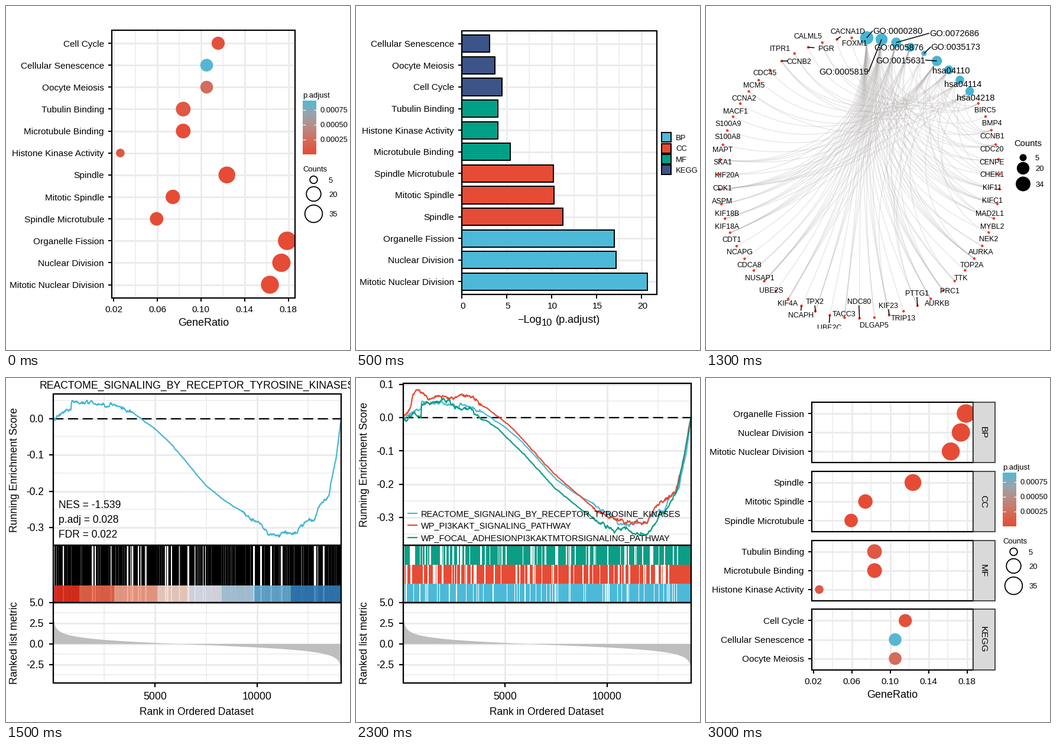
Recreate the animation shown at these times as a matplotlib script. Size 582 by 582 pixels, loop 3500 ms.

```python
import numpy as np
import matplotlib.pyplot as plt
from matplotlib.animation import FuncAnimation
from matplotlib.colors import LinearSegmentedColormap
from matplotlib.patches import Circle, PathPatch, Rectangle
from matplotlib.path import Path

plt.rcParams["font.family"] = "Liberation Sans"

SIZE = 582
BLUE, RED, GREEN, NAVY = "#4DB9D8", "#E64B35", "#00A087", "#3C5488"
GRID = "#EBEBEB"

# group: (bar colour, genes in the group)
GROUPS = {"BP": (BLUE, 190), "CC": (RED, 202), "MF": (GREEN, 191), "KEGG": (NAVY, 95)}
# term: (group, gene count, -log10 p)
TERMS = {
    "Cell Cycle": ("KEGG", 11, 4.44),
    "Cellular Senescence": ("KEGG", 10, 3.06),
    "Oocyte Meiosis": ("KEGG", 10, 3.65),
    "Tubulin Binding": ("MF", 16, 4.04),
    "Microtubule Binding": ("MF", 16, 5.36),
    "Histone Kinase Activity": ("MF", 5, 4.04),
    "Spindle": ("CC", 25, 11.23),
    "Mitotic Spindle": ("CC", 15, 10.27),
    "Spindle Microtubule": ("CC", 12, 10.17),
    "Organelle Fission": ("BP", 34, 16.97),
    "Nuclear Division": ("BP", 33, 17.17),
    "Mitotic Nuclear Division": ("BP", 31, 20.66),
}
P_MAP = LinearSegmentedColormap.from_list(
    "p", ["#E64B35", "#D36C5B", "#BB8A82", "#9AA4AB", BLUE])
P_MAX = 0.0009

fig = plt.figure(figsize=(SIZE / 72, SIZE / 72), dpi=72, facecolor="white")
ax = fig.add_axes([0, 0, 1, 1])


# ---------- drawing helpers, all in pixels ----------

def text(x, y, s, size=15.4, ha="left"):
    """Text whose capitals are centred on y."""
    ax.text(x, y + 0.36 * size, s, size=size, ha=ha, va="baseline")


def turned(x, y, s, size, angle):
    ax.text(x, y, s, size=size, ha="center", va="center", rotation=angle)


def line(x0, y0, x1, y1, color="black", lw=2.0, **kw):
    ax.plot([x0, x1], [y0, y1], color=color, lw=lw, solid_capstyle="butt", **kw)


def box(x0, y0, x1, y1, fill="none", edge="none", lw=2.0, **kw):
    patch = Rectangle((x0, y0), x1 - x0, y1 - y0, fc=fill, ec=edge, lw=lw, **kw)
    return ax.add_patch(patch)


def dot(x, y, r, fill, edge="none", lw=0, clip=None):
    patch = ax.add_patch(Circle((x, y), r, fc=fill, ec=edge, lw=lw))
    if clip is not None:
        patch.set_clip_path(clip)


def grid(rect, xs, ys, lw):
    x0, y0, x1, y1 = rect
    for x in xs:
        line(x, y0, x, y1, GRID, lw)
    for y in ys:
        line(x0, y, x1, y, GRID, lw)


# ---------- term charts ----------

def radius(count, base, step):
    return base + step * np.sqrt(count - 5)


def members(group):
    return [n for n in TERMS if TERMS[n][0] == group]


def ranked(group):
    return sorted(members(group), key=lambda n: TERMS[n][2])


def term_panel(names, rows, rect, ticks, mark):
    x0, _, x1, _ = rect
    grid(rect, (ticks[1:] + ticks[:-1]) / 2, [], 1.5)
    grid(rect, ticks, rows, 2.9)
    clip = box(*rect)
    for name, y in zip(names, rows):
        mark(name, y, clip)
        line(x0 - 6, y, x0 - 1, y)
        text(166, y, name, ha="right")
    box(*rect, edge="black", lw=2.2)


def facets(names_of, x1, y0, pitch, height, gap, ticks, mark):
    for group in GROUPS:
        rows = y0 + height / 2 + gap * np.arange(-1, 2)
        term_panel(names_of(group), rows, (179, y0, x1, y0 + height), ticks, mark)
        box(x1, y0, x1 + 37, y0 + height, "#D9D9D9", "#333333", 1.7)
        turned(x1 + 17, y0 + height / 2, group, 15.4, -90)
        y0 += pitch


def x_ticks(xs, labels, y, shift=0):
    for x, s in zip(xs, labels):
        line(x, y + 1, x, y + 6.5)
        text(x + shift, y + 18.8, s, ha="center")


def log_label(x, y):
    text(x, y, "\u2212Log", 18, "right")
    text(x, y + 5, "10", 16.5)
    text(x + 23.5, y, "(p.adjust)", 18)


def group_legend(y):
    for i, (name, (color, _)) in enumerate(GROUPS.items()):
        yc = y + 18.4 * i
        box(516.5, yc - 8, 532.5, yc + 8, color, "black", 2)
        text(541, yc, name, 13)


def dot_legend():
    text(502, 150.5, "p.adjust", 13)
    ax.imshow(np.linspace(1, 0, 200)[:, None], cmap=P_MAP, aspect="auto",
              extent=(502, 525, 251, 160))
    for y, s in ((175.5, "0.00075"), (200.5, "0.00050"), (225.5, "0.00025")):
        line(502, y, 506.5, y, "white", 1.2)
        line(520.5, y, 525, y, "white", 1.2)
        text(532, y, s, 12.9)
    text(502, 275, "Counts", 13)
    for y, n in ((294, 5), (318, 20), (351.5, 35)):
        dot(520.5, y, radius(n, 6.3, 1.55), "none", "black", 1.8)
        text(546, y, str(n), 13)


def dot_mark(ticks):
    scale = (ticks[1] - ticks[0]) / 0.04

    def mark(name, y, clip):
        group, count, value = TERMS[name]
        x = ticks[0] + (count / GROUPS[group][1] - 0.02) * scale
        dot(x, y, radius(count, 7.3, 1.55), P_MAP(10 ** -value / P_MAX), clip=clip)
    return mark


def bar_mark(ticks, half):
    scale = (ticks[1] - ticks[0]) / 5

    def mark(name, y, clip):
        group, _, value = TERMS[name]
        box(179, y - half, 179 + value * scale, y + half, GROUPS[group][0], "black", 2)
    return mark


RATIOS = ["0.02", "0.06", "0.10", "0.14", "0.18"]
LOGS = ["0", "5", "10", "15", "20"]


def dots_scene():
    ticks = 182 + 73.9 * np.arange(5)
    term_panel(TERMS, 63 + 37.14 * np.arange(12), (179, 41, 489, 493.5),
               ticks, dot_mark(ticks))
    x_ticks(ticks, RATIOS, 493.5)
    text(334, 535, "GeneRatio", 18, "center")
    dot_legend()


def bars_scene():
    ticks = 179 + 76.1 * np.arange(5)
    names = [n for g in reversed(GROUPS) for n in ranked(g)]
    term_panel(names, 63.7 + 36.6 * np.arange(12), (179, 42, 509, 488),
               ticks, bar_mark(ticks, 14.6))
    x_ticks(ticks, LOGS, 488, 1.5)
    log_label(314, 530)
    group_legend(222.2)


def bar_facets_scene():
    ticks = 179 + 67.6 * np.arange(5)
    facets(ranked, 472, 43, 115.1, 100.5, 31.5, ticks, bar_mark(ticks, 12.9))
    x_ticks(ticks, LOGS, 489, 1.5)
    log_label(295.5, 531)
    group_legend(223.2)


def dot_facets_scene():
    ticks = 181.5 + 65 * np.arange(5)
    facets(members, 452, 41, 116.8, 102.3, 32.1, ticks, dot_mark(ticks))
    x_ticks(ticks, RATIOS, 493.5)
    text(315.5, 535, "GeneRatio", 18, "center")
    dot_legend()


# ---------- gene network ----------

# clockwise: right side, bottom, left side, top
RIGHT = ("BIRC5 BMP4 CCNB1 CDC20 CENPE CHEK1 KIF11 KIFC1 MAD2L1 MYBL2 NEK2 AURKA "
         "TOP2A TTK PRC1 AURKB").split()
BOTTOM = "PTTG1 TRIP13 KIF23 DLGAP5 NDC80 TACC3 UBE2C TPX2 NCAPH KIF4A".split()
LEFT = ("UBE2S NUSAP1 CDCA8 NCAPG CDT1 KIF18A KIF18B ASPM CDK1 KIF20A SKA1 MAPT "
        "S100A8 S100A9 MACF1 CCNA2 MCM5 CDC45").split()
TOP = "CCNB2 ITPR1 PGR CALML5 CACNA1D FOXM1".split()
GENES = RIGHT + BOTTOM + LEFT + TOP
BOTTOM_DY = [-22, 11, -17, 12, -29, -7, 20, -17, 15, 7]
TOP_SHIFT = [(29, 0), (-24, -9), (31, 2), (-24, -11), (18, -14), (5, 9)]

# term: (label centre, genes)
NODES = {
    "GO:0000280": ((324, 42), " ".join(GENES[:34])),
    "GO:0005819": ((233, 111),
                   "BIRC5 CCNB1 CDC20 CENPE KIF11 KIFC1 MAD2L1 NEK2 AURKA TTK PRC1 "
                   "AURKB KIF23 DLGAP5 TACC3 TPX2 KIF4A NUSAP1 CDCA8 KIF18A KIF18B "
                   "ASPM CDK1 KIF20A SKA1"),
    "GO:0072686": ((420, 46),
                   "CDC20 KIF11 KIFC1 MAD2L1 AURKA PRC1 KIF23 TACC3 TPX2 NUSAP1 "
                   "KIF18A KIF18B ASPM CDK1 SKA1"),
    "GO:0005876": ((326, 69.5),
                   "BIRC5 KIF11 KIFC1 AURKA PRC1 AURKB KIF4A NUSAP1 KIF18A CDK1 SKA1"),
    "GO:0035173": ((422.5, 69), "CCNB1 CHEK1 AURKA AURKB CDK1"),
    "GO:0015631": ((329, 91.5),
                   "BIRC5 CENPE KIF11 KIFC1 PRC1 KIF23 NUSAP1 KIF4A KIF18A KIF18B "
                   "KIF20A SKA1 MAPT S100A8 S100A9 MACF1"),
    "hsa04110": ((414.5, 108.5),
                 "CCNB1 CDC20 CHEK1 MAD2L1 TTK PTTG1 CDK1 CCNA2 MCM5 CDC45 CCNB2"),
    "hsa04114": ((434.5, 132),
                 "CCNB1 CDC20 MAD2L1 AURKA PTTG1 CDK1 CCNB2 ITPR1 PGR CALML5"),
    "hsa04218": ((456, 154.5),
                 "CCNB1 CHEK1 MYBL2 CDK1 CCNA2 CCNB2 ITPR1 CALML5 CACNA1D FOXM1"),
}
HUB = np.array([259.5, 291])
ANGLE = {n: np.radians(3 + 360 / 59 * i) for i, n in enumerate([*NODES, *GENES])}


def place(name):
    a = ANGLE[name]
    return HUB + 237.5 * np.array([np.sin(a), -np.cos(a)])


def edge(term, gene):
    """Arc pulled towards the hub, deeper for distant nodes."""
    p, q = place(term), place(gene)
    k = 1 - 0.8 * abs(np.sin((ANGLE[gene] - ANGLE[term]) / 2))
    path = Path([p, HUB + k * (p - HUB), HUB + k * (q - HUB), q],
                [Path.MOVETO] + [Path.CURVE4] * 3)
    ax.add_patch(PathPatch(path, fc="none", ec="#B5AFAF", alpha=0.3, lw=1.4))


def gene_labels():
    """Even rows at the sides, shifted labels with leaders elsewhere."""
    def label(x, y, gene):
        text(x, y, gene, 12.4, "center")

    for i, gene in enumerate(RIGHT):
        label(min(place(gene)[0] + 11, 504 - 4 * len(gene)), 176 + 21.8 * i, gene)
    for i, gene in enumerate(LEFT):
        label(max(place(gene)[0] - 8, 12 + 4 * len(gene)), 481 - 21.7 * i, gene)
    for gene, dy in zip(BOTTOM, BOTTOM_DY):
        x, y = place(gene)
        if abs(dy) > 14:
            line(x, y, x - 1, y + dy - 7 * np.sign(dy), lw=1.5)
        label(x - 1, y + dy, gene)
    for gene, (dx, dy) in zip(TOP, TOP_SHIFT):
        x, y = place(gene)
        if dx > 14:
            line(x, y, x + 0.35 * dx, y + 0.35 * dy, lw=1.5)
        label(x + dx, y + dy, gene)


def network_scene():
    for term, (_, genes) in NODES.items():
        for gene in genes.split():
            edge(term, gene)
    for term, (_, genes) in NODES.items():
        dot(*place(term), radius(len(genes.split()), 4.5, 1.25), "#47B5D3")
    for gene in GENES:
        dot(*place(gene), 2.2, "#EA3A28")
    for term, ((x, y), _) in NODES.items():
        node, half = place(term), 4.2 * len(term)
        if abs(node[0] - x) > half:
            line(*node, x + half * np.sign(node[0] - x), y, lw=1.5)
        text(x, y, term, 14.6, "center")
    gene_labels()
    box(0, 546, SIZE, SIZE, "white")
    text(521, 231.5, "Counts", 14.7)
    for y, n in ((256.5, 5), (274.5, 20), (301, 34)):
        dot(536.5, y, radius(n, 6, 1.2), "black")
        text(557, y, str(n), 13)


# ---------- enrichment plots ----------

L, R = 79.5, 567
RTK = [(80, 68), (83, 70), (90, 62), (110, 53), (111, 40), (150, 43), (183, 45),
       (212, 57), (255, 88), (280, 112), (340, 184), (365, 204), (430, 247),
       (445, 262), (463, 270), (466, 262), (490, 262), (505, 243), (523, 239),
       (528, 222), (546, 198), (557, 145), (567, 69)]
PI3K = [(80, 67), (93, 50), (96, 30), (103, 22), (120, 33), (170, 34), (176, 25),
        (200, 35), (235, 61), (265, 85), (310, 135), (335, 162), (405, 222),
        (445, 243), (492, 248), (496, 236), (512, 211), (540, 192), (552, 150),
        (567, 67)]
FOCAL = [(80, 67), (84, 71), (95, 59), (110, 66), (111, 43), (142, 42), (145, 35),
         (168, 50), (190, 51), (213, 66), (240, 86), (285, 130), (335, 185),
         (380, 222), (438, 261), (446, 254), (492, 267), (508, 245), (514, 229),
         (522, 230), (543, 190), (554, 138), (567, 67)]


def score(points, color, seed, zero=0.0, scale=1.0):
    """Running score through key points, ragged near both ends."""
    rng = np.random.default_rng(seed)
    x = np.arange(80, 567.2, 0.7)
    rough = np.where((x < 215) | (x > 400), 1.2, 0.25)
    wobble = np.zeros(x.size)
    for i in range(1, x.size):
        wobble[i] = 0.8 * wobble[i - 1] + rough[i] * rng.normal()
    y = np.interp(x, *np.array(points).T) + wobble
    ax.plot(x, zero + y * scale, color=color, lw=2.2)


def y_ticks(ys, labels):
    for y, s in zip(ys, labels):
        line(L - 7, y, L - 1, y, lw=2.2)
        text(64, y, s, 17.5, "right")


def back_grid(top, bottom, ticks, minors):
    rect = (L, top, R, bottom)
    grid(rect, (166, 338.5, 511), minors, 1.5)
    grid(rect, (252, 425), ticks, 3)


def score_panel(top, ticks, minors, labels, zero):
    back_grid(top, 283, ticks, minors)
    y_ticks(ticks, labels)
    turned(15, (top + 283) / 2 + 1, "Running Enrichment Score", 17.6, 90)
    line(L, zero, R, zero, lw=2.2, dashes=(7.8, 3.5), dash_capstyle="butt")


def metric_panel():
    ticks = 380 + 34.85 * np.arange(4)
    back_grid(380, 516, ticks, ticks + 17.4)
    x = np.arange(80, 567.5, 0.5)
    u = np.clip((x - 79.8) / 487.5, 1e-4, 0.9985)
    logit = np.log((1 - u) / u)
    height = 5 * logit + 0.25 * logit * abs(logit) - 1.3
    ax.fill_between(x, 449.5, 449.5 - height, color="#BEBEBE", lw=0)
    y_ticks(ticks, ["5.0", "2.5", "0.0", "-2.5"])
    turned(15, 448, "Ranked list metric", 17.6, 90)
    for px, s in ((252, "5000"), (425, "10000")):
        line(px, 517, px, 523, lw=2.2)
        text(px, 537.5, s, 17.8, "center")
    text(322.5, 564, "Rank in Ordered Dataset", 17.5, "center")


def barcode(y0, y1, color, seed, count, wide):
    """Solid band cut by random gaps."""
    rng = np.random.default_rng(seed)
    box(L + 2, y0, R, y1, color)
    for x, w in zip(rng.uniform(83, 545, count), rng.uniform(0.6, wide, count)):
        box(x, y0, x + w, y1, "white")


def heat_bar():
    bounds = [80, 124, 183, 256, 309, 365, 420, 482, 567]
    colors = ["#E6301F", "#F0674D", "#F8A48D", "#FADACD", "#E6E8F3", "#B2D0E3",
              "#68ADD6", "#327DBA"]
    for x0, x1, color in zip(bounds, bounds[1:], colors):
        box(x0, 351, x1, 379, color, alpha=0.9)


def frames(top):
    for y0, y1 in ((top, 283), (283, 380), (380, 516)):
        box(L, y0, R, y1, edge="black", lw=2.3)


def single_scene():
    text(57, 11.5, "REACTOME_SIGNALING_BY_RECEPTOR_TYROSINE_KINASES", 17.6)
    ticks = 68.5 + 61.5 * np.arange(4)
    score_panel(26.5, ticks, ticks - 30.7, ["0.0", "-0.1", "-0.2", "-0.3"], 68.5)
    score(RTK, "#43B6D3", 4)
    for i, s in enumerate(("NES = -1.539", "p.adj = 0.028", "FDR = 0.022")):
        text(89, 213.5 + 25.3 * i, s, 17.5)
    barcode(283, 379, "black", 1, 28, 3.2)
    rng = np.random.default_rng(7)
    for x in rng.uniform(82, 560, 70):
        line(x, 283, x, 379, str(rng.uniform(0.15, 0.5)), 0.7)
    heat_bar()
    metric_panel()
    frames(26.5)


def triple_scene():
    ticks = 10.5 + 56.4 * np.arange(5)
    score_panel(8.5, ticks, ticks + 28.2, ["0.1", "0.0", "-0.1", "-0.2", "-0.3"], 67)
    score(RTK, "#55BAD5", 4, 67 - 68.5 * 0.918, 0.918)
    score(PI3K, RED, 5)
    score(FOCAL, "#0B9E86", 6)
    for y, color, s in (
            (228.5, "#45BEC6", "REACTOME_SIGNALING_BY_RECEPTOR_TYROSINE_KINASES"),
            (248.5, RED, "WP_PI3KAKT_SIGNALING_PATHWAY"),
            (270, GREEN, "WP_FOCAL_ADHESIONPI3KAKTMTORSIGNALING_PATHWAY")):
        line(87, y, 104, y, color, 2.2)
        text(110, y, s, 14.45)
    barcode(283, 315.5, "#0B9E86", 11, 75, 3)
    barcode(315.5, 348, RED, 12, 75, 3)
    barcode(348, 379, BLUE, 13, 70, 1.5)
    metric_panel()
    frames(8.5)


SCENES = [dots_scene, bars_scene, network_scene, single_scene,
          triple_scene, bar_facets_scene, dot_facets_scene]


def draw(i):
    ax.clear()
    ax.set_axis_off()
    ax.set_xlim(0, SIZE)
    ax.set_ylim(SIZE, 0)
    SCENES[i]()
    # paint strictly in drawing order
    for z, artist in enumerate(ax.get_children()):
        if artist is not ax.patch:
            artist.set_zorder(z + 1)
    return []


anim = FuncAnimation(fig, draw, frames=len(SCENES), interval=500,
                     repeat=True, repeat_delay=0, blit=False)
plt.show()
```
